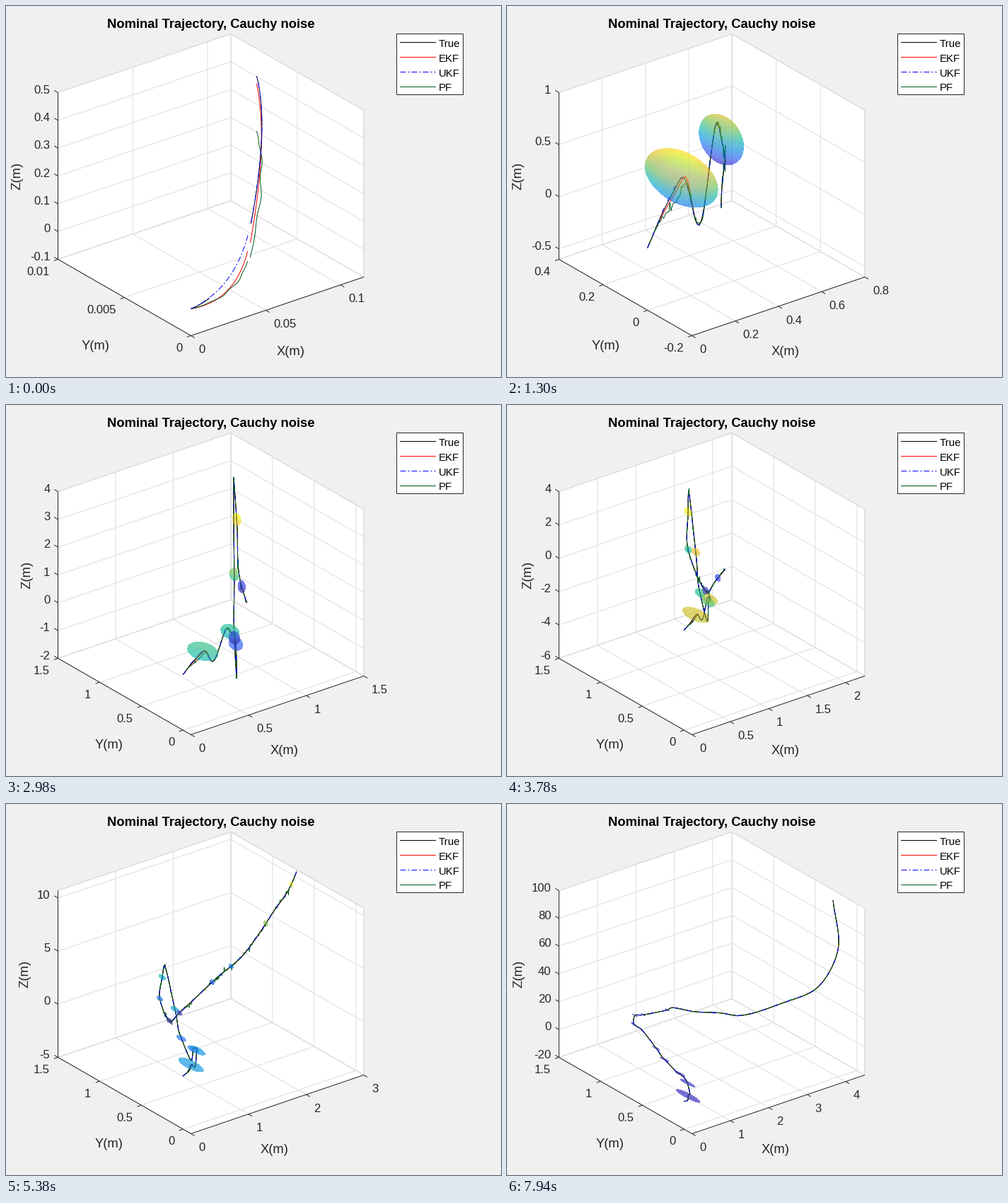
A matplotlib script for the animation above (8 s loop, 700 by 525 pixels).

```python
import math
import numpy as np
import matplotlib.pyplot as plt
from matplotlib.animation import FuncAnimation
from matplotlib.collections import LineCollection
from matplotlib.colors import LinearSegmentedColormap

W, H, DPI = 700, 525, 100
PX = 72 / DPI                       # points per pixel
TICK_MS = 20
PER_STEP = 10                       # samples per animation step
DARK, GREEN = "#262626", "#00591f"

plt.rcParams["font.family"] = "Liberation Sans"
plt.rcParams["path.snap"] = False

# screen = ORIGIN + AXES @ (u, v, w), with u, v, w in 0..1 across the box
ORIGIN = np.array([261.0, 466.0])
AXES = np.array([[244.5, -188.0, 0.0], [-83.0, -108.0, -236.0]])

PARULA = LinearSegmentedColormap.from_list("parula", [
    "#3e26a8", "#4852f4", "#2e87f7", "#12b1d6", "#37c897", "#abc739", "#fec338", "#f9fb15"])

# key points of the flight: step, x, y, z
PATH = np.array([
    (-4, 0, 0, 0), (0, .116, .008, .40), (1, .204, .046, .47), (3.6, .34, .087, -.07),
    (5.2, .52, .195, .60), (6, .567, .22, .37), (11, .74, .39, -.60), (13.8, .80, .465, -2.0),
    (16, .92, .657, -1.1), (21, 1.03, .81, .76), (24, 1.2, 1.05, 3.4), (26, 1.29, 1.14, 1.8),
    (31, 1.42, 1.26, -1.0), (36, 1.83, 1.43, -4.6), (41, 1.95, 1.39, -3.9), (46, 2.39, 1.3, -1.4),
    (49, 2.52, 1.3, -1.0), (53, 2.66, 1.1, 1.7), (57, 2.85, .9, 6.0), (62, 2.95, .68, 10.7),
    (69, 3.3, .35, 27.5), (78, 3.55, 0, 50.8), (85, 4.0, 0, 70.8), (94, 4.3, .194, 97.4)])


def position(s):
    """Smooth 3D path through the key points."""
    s = np.asarray(s, float)
    t, p = PATH[:, 0], PATH[:, 1:]
    slope = np.gradient(p, t, axis=0)
    i = np.clip(np.searchsorted(t, s, side="right") - 1, 0, len(t) - 2)
    h = (t[i + 1] - t[i])[:, None]
    q = (s - t[i])[:, None] / h
    return ((2 * q**3 - 3 * q**2 + 1) * p[i] + (q**3 - 2 * q**2 + q) * h * slope[i]
            + (3 * q**2 - 2 * q**3) * p[i + 1] + (q**3 - q**2) * h * slope[i + 1])


def project(uvw):
    return ORIGIN + np.asarray(uvw) @ AXES.T


# true and estimated tracks
S = np.arange(-4 * PER_STEP, 94 * PER_STEP + 1) / PER_STEP
TRUE = position(S)
bump = np.exp(-((S - .3) / 1.5)**2)
rng = np.random.RandomState(4)
amp = .012 * (1 + np.clip(S, 0, None) / 15)
jitter = amp * np.clip(rng.standard_t(2, len(S)), -8, 8) * np.clip((S + 4) / 3, 0, 1)


def track(dx, dz):
    return TRUE + np.stack([dx, 0 * S, dz], 1)


TRACKS = [TRUE, track(.014 * bump, 0 * S), track(-.006 * bump, 0 * S),
          track(.015 * bump, jitter - .09 * bump)]


def bezier(a, b, c, wiggle=0):
    t = np.linspace(0, 1, 40)[:, None]
    p = (1 - t)**2 * np.array(a) + 2 * t * (1 - t) * np.array(b) + t**2 * np.array(c)
    return p + wiggle * np.sin(20 * t) * np.sin(np.pi * t) * [1, 0]


def opening(bend, stop, start, arc, end, wiggle=0):
    """Two screen arcs from the launch point, with a gap between them."""
    return np.vstack([bezier((261, 428), bend, stop, wiggle), [[np.nan] * 2],
                      bezier(start, arc, end, wiggle)])


OPENING = [opening((274, 423), (287, 413), (346, 307), (372, 168), (354, 99)),
           opening((323, 418), (341, 347), (345, 334), (371, 190), (354, 110)),
           opening((322, 400), (342, 322), (346, 306), (372, 168), (354, 99)),
           opening((325, 413), (341, 361), (345, 355), (371, 235), (354, 177), 1.6)]

# covariance ellipsoids, one every five steps, shrinking sideways
ORDER = np.arange(1, 19)
CENTRES = position(5 * ORDER - 4)
RADII = np.stack([.09 * ORDER**-.7, .14 * ORDER**-.7, np.full(len(ORDER), .22)], 1)


def nice(value):
    base = 10.0 ** math.floor(math.log10(value))
    return base * next(m for m in (1, 2, 5, 10) if m * base >= value * (1 - 1e-9))


def fit_axis(lo, hi, max_ticks, snap):
    """Round the range outward while that wastes at most a quarter of it."""
    spare = .25 * (hi - lo)
    step = nice((hi - lo) / max_ticks)
    grid = step * snap
    top = math.ceil(hi / grid - 1e-6) * grid
    bottom = math.floor(lo / grid + 1e-6) * grid
    if top - hi <= spare:
        spare -= top - hi
        hi = top
    if lo - bottom <= spare:
        lo = bottom
    return lo, hi, step


def limits(k, n):
    if k == 0:
        return [(0, .1156, .05), (0, .01, .005), (-.1, .5, .1)]
    pts = np.vstack([TRUE[:(k + 4) * PER_STEP + 1], CENTRES[:n] - RADII[:n],
                     CENTRES[:n] + RADII[:n]])
    return [fit_axis(lo, hi, m, snap) for lo, hi, m, snap in
            zip(pts.min(0), pts.max(0), (4.7, 4.7, 6), (.5, 1, 1))]


def paint(layer, window, mask, colours, alpha=.47):
    """Blend colours over the masked part of a window of an RGBA layer."""
    old = layer[window][mask]
    keep = old[:, 3:] * (1 - alpha)
    total = alpha + keep
    rgb = (colours[:, :3] * alpha + old[:, :3] * keep) / total
    part = layer[window]
    part[mask] = np.hstack([rgb, total])


def blob_layers(n, low, span):
    """Far and near surfaces of the first n ellipsoids, by ray intersection."""
    layers = [np.zeros((H, W, 4)) for _ in range(2)]
    bounds = []
    c, r = CENTRES[:n], RADII[:n]
    zmin, zmax = (c - r)[:, 2].min(), (c + r)[:, 2].max()
    for centre, radius in zip(c, r):
        m = AXES * (radius / span)
        mid = project((centre - low) / span)
        half = np.sqrt((m * m).sum(1))
        x0, y0 = np.floor(mid - half).astype(int)
        x1, y1 = np.ceil(mid + half).astype(int) + 1
        bounds.append((x0, y0, x1, y1))
        yy, xx = np.mgrid[y0:y1, x0:x1]
        foot = np.stack([xx - mid[0], yy - mid[1]], -1) @ np.linalg.pinv(m).T
        inside = (foot**2).sum(-1) <= 1
        foot = foot[inside]
        ray = np.cross(m[0], m[1])
        ray_z = abs(ray[2]) / np.linalg.norm(ray)
        reach = np.sqrt(1 - (foot**2).sum(-1)) * ray_z
        for layer, side in zip(layers, (-1, 1)):
            z = centre[2] + radius[2] * (foot[:, 2] + side * reach)
            colours = PARULA((z - zmin) / (zmax - zmin))
            paint(layer, (slice(y0, y1), slice(x0, x1)), inside, colours)
    b = np.array(bounds)
    (x0, y0), (x1, y1) = b[:, :2].min(0), b[:, 2:].max(0)
    return [(layer[y0:y1, x0:x1] * 255).astype(np.uint8) for layer in layers], x0, H - y1


fig = plt.figure(figsize=(W / DPI, H / DPI), dpi=DPI, facecolor="#f0f0f0")


def stage(zorder):
    ax = fig.add_axes([0, 0, 1, 1], zorder=zorder)
    ax.set_xlim(-.5, W - .5)
    ax.set_ylim(H - .5, -.5)
    ax.axis("off")
    return ax


back, front = stage(0), stage(2)
blobs = [fig.figimage(np.zeros((2, 2, 4), np.uint8), origin="upper", zorder=z) for z in (1, 3)]


def write(x, y, text, px, **kw):
    return back.text(x, y, text, fontsize=px * PX, **{"va": "baseline", "color": DARK, **kw})


def segments(color, paths=()):
    return back.add_collection(LineCollection(paths, colors=color, linewidths=PX))


hexagon = project([(0, 1, 0), (0, 1, 1), (1, 1, 1), (1, 0, 1), (1, 0, 0), (0, 0, 0)])
back.add_patch(plt.Polygon(hexagon, fc="white", ec="none"))
segments("#d0d0d0", [project(e) for e in ([(0, 1, 1), (1, 1, 1), (1, 0, 1), (1, 0, 0)],
                                          [(0, 1, 0), (1, 1, 0), (1, 0, 0)],
                                          [(1, 1, 0), (1, 1, 1)])])
grid, rulers = segments("#dedede"), segments(DARK)

DASHDOT = (0, (8, 3, 2, 3))
SPARSE = (0, (6, 12))
# name, colour, legend style, track style, stacking
STYLES = [("True", "black", "-", "-", 2), ("EKF", "red", "-", "-", 1),
          ("UKF", "blue", DASHDOT, SPARSE, 4), ("PF", GREEN, "-", "-", 3)]
lines = [front.plot([], [], color=c, lw=PX, zorder=z)[0] for _, c, _, _, z in STYLES]

back.add_patch(plt.Rectangle((552, 39), 94, 86, fc="white", ec=DARK, lw=PX))
for i, (name, color, style, *_) in enumerate(STYLES):
    y = 51 + 21 * i
    back.plot([557, 607], [y, y], color=color, ls=style, lw=PX)
    write(611, 58 + 20.5 * i, name, 15, color="black")

write(289.5, 30.5, "Nominal Trajectory, Cauchy noise", 18.33, ha="center",
      color="black", weight="bold")
x_name = write(0, 493, "X(m)", 18.33, ha="center")
y_name = write(0, 486, "Y(m)", 18.33, ha="center")
z_name = write(0, 240, "Z(m)", 18.33, ha="center", va="center", rotation=90)
labels = [write(0, 0, "", 16.67) for _ in range(32)]

# per axis: tick vector, label offset, alignment
OUTWARD = np.array([(5.2, 3.0), (-5.7, 1.9), (-5.2, -3.0)])
OFFSET = np.array([(11, 24.5), (-12, 22.3), (-11, 1)])
ALIGN = ("left", "right", "right")


def ticks(lo, hi, step):
    first, last = math.ceil(lo / step - 1e-6), math.floor(hi / step + 1e-6)
    return [round(n * step, 6) + 0.0 for n in range(first, last + 1)]


def label_width(text):
    return sum({".": .278, "-": .333}.get(c, .556) for c in text) * 16.67


def draw_axes(lims):
    grid_segs, marks, texts, widths = [], [], [], []
    for axis, (lo, hi, step) in enumerate(lims):
        names = []
        for value in ticks(lo, hi, step):
            q = (value - lo) / (hi - lo)
            route = project([[(q, 0, 0), (q, 1, 0), (q, 1, 1)],
                             [(0, q, 0), (1, q, 0), (1, q, 1)],
                             [(0, 1, q), (1, 1, q), (1, 0, q)]][axis])
            grid_segs.append(route)
            marks.append([route[0], route[0] + OUTWARD[axis]])
            names.append(f"{value:g}")
            texts.append((route[0] + OFFSET[axis], names[-1], ALIGN[axis]))
        widths.append(max(map(label_width, names)))
    grid.set_segments(grid_segs)
    rulers.set_segments(marks + [project([(1, 0, 0), (0, 0, 0), (0, 1, 0), (0, 1, 1)])])
    for label in labels:
        label.set_text("")
    for label, (p, text, align) in zip(labels, texts):
        label.set(position=p, text=text, ha=align)
    x_name.set_x(370 + widths[0])
    y_name.set_x(168 - widths[1])
    z_name.set_x(44.5 - widths[2])


def draw(i):
    t = i * TICK_MS
    k = 0 if t < 500 else (t - 500) // 80 + 1
    n = (k + 3) // 5
    lims = limits(k, n)
    low = np.array([lim[0] for lim in lims])
    span = np.array([lim[1] for lim in lims]) - low
    draw_axes(lims)

    count = (k + 4) * PER_STEP + 1
    for line, start, path, (_, _, style, moving, _) in zip(lines, OPENING, TRACKS, STYLES):
        pts = project((path[:count] - low) / span) if k else start
        line.set_data(pts[:, 0], pts[:, 1])
        line.set_linestyle(moving if k else style)

    for image in blobs:
        image.set_visible(n > 0)
    if n:
        layers, x, y = blob_layers(n, low, span)
        for image, layer in zip(blobs, layers):
            image.set_data(layer)
            image.ox, image.oy = x, y
    return []


anim = FuncAnimation(fig, draw, frames=8000 // TICK_MS, interval=TICK_MS,
                     init_func=lambda: draw(0), repeat=True, blit=False)
plt.show()
```
